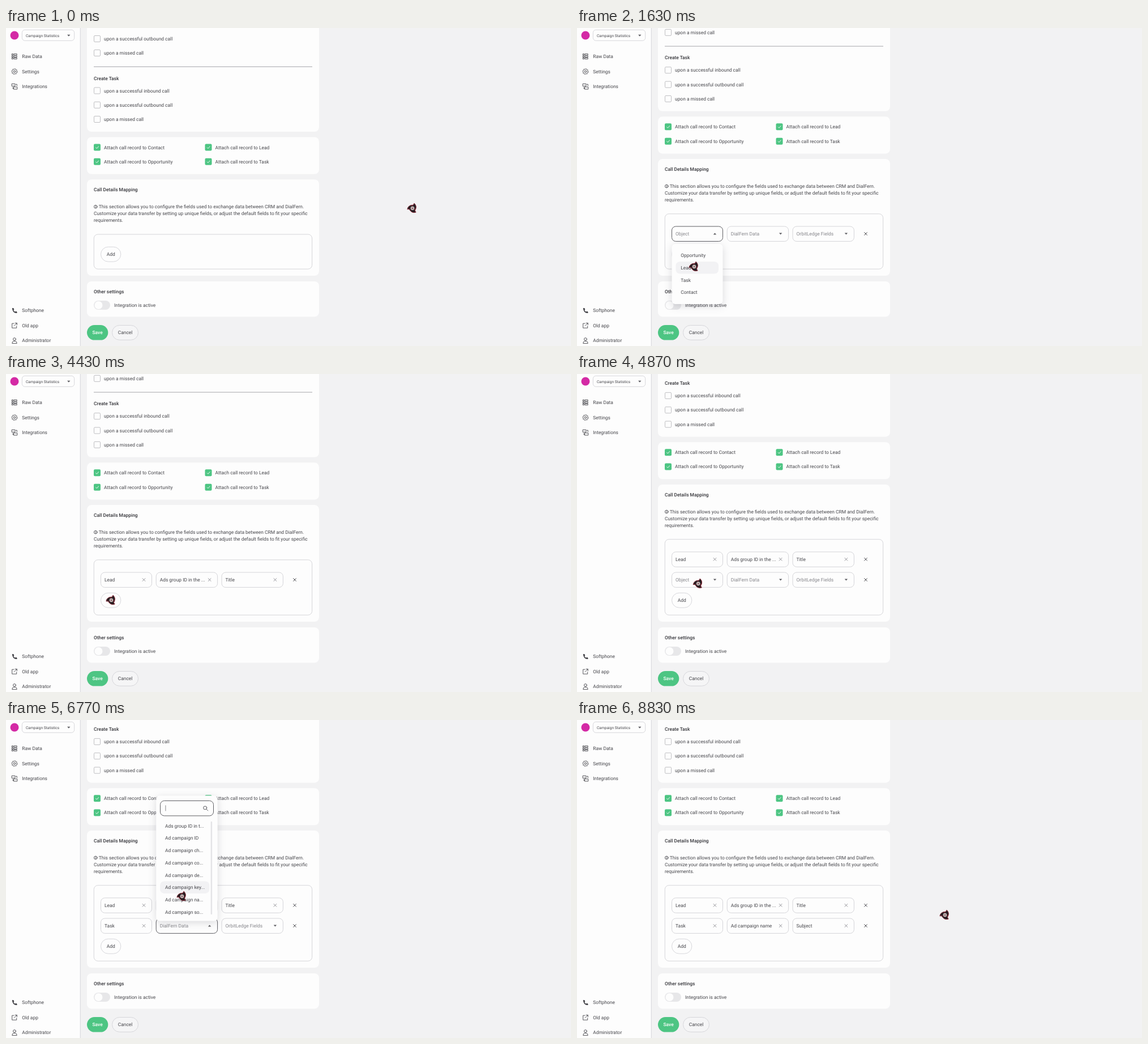
Animation, 998 px wide and 561 px high, one loop 8.86 s. Source, as an HTML page:

```html
<!DOCTYPE html>
<html lang="en">
<head>
<meta charset="utf-8">
<title>Field mapping</title>
<style>
  html, body { margin: 0; height: 100%; overflow: hidden; background: #f2f2f3; }
  svg { display: block; width: 100vw; height: 100vh; }
  text { font: 8.44px Roboto, Arial, sans-serif; fill: #46464b; text-rendering: geometricPrecision; white-space: pre; }
  .head { font-weight: 500; fill: #35353a; }
  .small { font-size: 6.63px; }
  .hint { fill: #85858a; }
  .white { fill: #fff; font-weight: 500; }
  .mid { text-anchor: middle; }
  .icon { fill: none; stroke: #46464b; stroke-width: .9; stroke-linejoin: round; stroke-linecap: round; }
  .pop { filter: drop-shadow(0 3px 7px rgba(40, 40, 60, .17)); }
</style>
</head>
<body>
<svg viewBox="0 0 998 561" preserveAspectRatio="none">
  <g id="page"></g>
  <g id="side"></g>
  <g id="over"></g>
  <g id="cursor"></g>
</svg>
<script>
const LOOP = 8860, ROW = 36.15, ROW_Y = 363;
const $ = id => document.getElementById(id);
const CARD = '#fdfdfd', LINE = '#d3d3d7', DARK = '#55555a', GREEN = '#4dc583';

// Drawing helpers; the y of text is its visual centre
const text = (x, y, s, cls = '') => `<text x="${x}" y="${y + 3}" class="${cls}">${s}</text>`;
const box = (x, y, w, h, r, fill, stroke = 'none', more = '') =>
  `<rect x="${x}" y="${y}" width="${w}" height="${h}" rx="${r}" fill="${fill}" stroke="${stroke}" ${more}/>`;
const path = (d, more = 'class="icon"') => `<path d="${d}" ${more}/>`;
const cross = (x, y, color) =>
  path(`M${x - 2.7} ${y - 2.7}l5.4 5.4m0-5.4l-5.4 5.4`, `stroke="${color}" stroke-width=".9"`);
const caret = (x, y, up) =>
  path(up ? `M${x - 2.7} ${y + 1.5}h5.4l-2.7-3z` : `M${x - 2.7} ${y - 1.5}h5.4l-2.7 3z`, 'fill="#5c5c61"');
const pill = (x, w, y, s) => box(x, y - 13, w, 26, 13, CARD, LINE, 'stroke-width=".9"') + text(x + w / 2, y, s, 'mid');
const group = (dy, s) => `<g transform="translate(0 ${dy})">${s}</g>`;

function check(x, y, label, on) {
  const mark = on
    ? box(x, y - 6, 12, 12, 2, GREEN) + path(`M${x + 3.4} ${y}l2 2 3.4-3.9`, 'fill="none" stroke="#fff" stroke-width=".9"')
    : box(x + .5, y - 5.5, 11, 11, 1.5, CARD, '#b8b8bc', 'stroke-width=".9"');
  return mark + text(x + 18, y, label);
}

const COLS = [
  { x: 167.5, w: 90, hint: 'Object' },
  { x: 265.2, w: 108.4, hint: 'DialFern Data' },
  { x: 381, w: 108.4, hint: 'OrbitLedge Fields' }
];
const OBJECTS = ['Opportunity', 'Lead', 'Task', 'Contact'];
const DATA = ['Ads group ID in t...', ...['ID', 'ch...', 'co...', 'de...', 'key...', 'na...', 'so...'].map(s => 'Ad campaign ' + s)];
const LEAD = ['*Last Name', 'First Name', 'Salutation', 'Title', '*Company', 'Street', 'City', 'State/Province'];
const TASK = ['Subject', 'Due Date', 'Priority', 'Status', 'Comments', 'Type', 'Call Result', 'Related To'];

// Each row: when it is added, when its spinner ends, and per column the open and pick times
const ROWS = [
  { add: 780, ready: 2000, steps: [
    { open: 1180, pick: 1700, list: OBJECTS, value: 'Lead' },
    { open: 2040, pick: 2500, list: DATA, value: 'Ads group ID in the ...' },
    { open: 3000, pick: 3580, list: LEAD, value: 'Title' }] },
  { add: 4560, ready: 5950, steps: [
    { open: 4960, pick: 5470, list: OBJECTS, value: 'Task' },
    { open: 6230, pick: 6950, list: DATA, value: 'Ad campaign name' },
    { open: 7380, pick: 7980, list: TASK, value: 'Subject' }] }
];

// Pointer stops: time, x, y
const PATH = [
  [0, 718, 318], [30, 718, 318], [700, 193, 404], [860, 193, 404], [1100, 215, 369], [1250, 215, 369],
  [1630, 207, 421], [1720, 207, 421], [1950, 320, 370], [2120, 320, 370], [2420, 318, 195], [2560, 318, 195],
  [2900, 424, 369], [3100, 424, 369], [3450, 412, 259], [3680, 412, 259], [4200, 186, 399], [4600, 186, 399],
  [4900, 215, 369], [5050, 215, 369], [5400, 205, 451], [5560, 205, 451], [5730, 239, 438], [6130, 318, 369],
  [6300, 318, 369], [6770, 311, 311], [6880, 313, 323], [7000, 313, 323], [7300, 424, 369], [7480, 424, 369],
  [7850, 412, 194], [8060, 412, 194], [8820, 650, 344], [LOOP, 650, 344]
];

function pointer(t) {
  const i = PATH.findIndex(p => p[0] > t);
  const [t0, x0, y0] = PATH[i - 1], [t1, x1, y1] = PATH[i];
  const k = (t - t0) / (t1 - t0), e = k * k * (3 - 2 * k);
  return [x0 + (x1 - x0) * e, y0 + (y1 - y0) * e];
}

function drawField(col, y, step, t, loading) {
  const { x, w, hint } = COLS[col], end = x + w - 14;
  const open = t >= step.open && t < step.pick, done = t >= step.pick;
  const mark = done ? cross(end, y, '#8b8b90') : caret(end, y, open && t > step.open + 100);
  const body = box(x, y - 13, w, 26.4, 7, CARD, open ? DARK : LINE, 'stroke-width=".95"')
    + text(x + 6.5, y, done ? step.value : hint, done ? '' : 'hint') + mark;
  if (!loading) return body;
  return `<g opacity=".7">${body}</g>`
    + `<circle cx="435" cy="${y}" r="4" fill="none" stroke="#65b9b4" stroke-dasharray="17 8" transform="rotate(${t * .4 % 360 | 0} 435 ${y})"/>`;
}

function drawRow(row, y, t) {
  if (t < row.add) return '';
  const loading = t >= row.steps[0].pick && t < row.ready;
  return row.steps.map((s, i) => drawField(i, y, s, t, loading && i === 2)).join('') + cross(510, y, '#3c3c41');
}

function drawList(col, step, t, hover) {
  const { x, w } = COLS[col], search = col > 0, first = search ? 186.7 : 401.2;
  const top = search ? 133.5 : 381, height = search ? 221 : 106;
  let s = box(x, top, w, height, 6, CARD, 'none', 'class="pop"');
  if (search) {
    const focus = t > step.open + 100;
    s += box(x + 7.3, 142.5, 94, 26.5, 7, CARD, focus ? DARK : LINE, 'stroke-width=".95"')
      + `<circle cx="${x + 86.5}" cy="155" r="3" class="icon"/>` + path(`M${x + 88.8} 157.4l2.6 2.6`)
      + box(x + 96.5, 179, 2.4, 164, 1, '#e3e3e6');
    if (step.list !== DATA) s += box(x + 96.5, 179, 2.4, 30, 1, '#c3c3c8');
    if (focus && (t - step.open) % 1000 < 600) s += path(`M${x + 16.7} 150.5v10`, 'stroke="#55555a" stroke-width=".7"');
  }
  return s + step.list.map((item, i) => {
    const y = first + i * 21.7, lit = Math.abs(hover - y) < 10.85;
    return (lit ? box(x + 7, y - 10.7, search ? 87 : 75.5, 21.4, 7, '#f2f2f4') : '') + text(x + 15.7, y, item);
  }).join('');
}

function drawPage(t) {
  const count = ROWS.filter(r => t >= r.add).length, up = -ROW * count;
  const upper = box(143, -80, 410, 263, 8, CARD)
    + check(155, -7, 'upon a successful inbound call')
    + check(155, 19, 'upon a successful outbound call') + check(155, 44, 'upon a missed call')
    + path('M155 68.3H541', 'stroke="#a5a5aa" stroke-width="1"')
    + text(155, 88.5, 'Create Task', 'head')
    + check(155, 110.5, 'upon a successful inbound call')
    + check(155, 135.8, 'upon a successful outbound call') + check(155, 161, 'upon a missed call')
    + box(143, 192.5, 410, 65.3, 8, CARD)
    + check(155, 210.5, 'Attach call record to Contact', true) + check(351.5, 210.5, 'Attach call record to Lead', true)
    + check(155, 235.8, 'Attach call record to Opportunity', true) + check(351.5, 235.8, 'Attach call record to Task', true);
  const mapping = text(155, 285, 'Call Details Mapping', 'head')
    + '<circle cx="158.3" cy="315.3" r="2.8" class="icon"/>' + path('M158.3 315v1.8m0-3.4v.2')
    + text(163.8, 315.2, 'This section allows you to configure the fields used to exchange data between CRM and DialFern.')
    + text(155, 327.2, 'Customize your data transfer by setting up unique fields, or adjust the default fields to fit your specific')
    + text(155, 339.2, 'requirements.');
  return group(up, upper)
    + box(143, 267.2 + up, 410, 169.8 - up, 8, CARD) + group(up, mapping)
    + box(155.3, 364 + up, 385.3, 61.2 - up, 7, CARD, LINE, 'stroke-width=".95"')
    + ROWS.map((r, i) => drawRow(r, ROW_Y - ROW * (count - 1 - i), t)).join('')
    + pill(167.5, 35.3, 399.2, 'Add')
    + box(143, 447, 410, 62.3, 8, CARD) + text(155, 464.5, 'Other settings', 'head')
    + box(155, 481, 29, 16, 8, '#e7e7e9') + '<circle cx="163.5" cy="489" r="7" fill="#fdfdfd"/>'
    + text(191, 489, 'Integration is active')
    + box(143, 524, 37.3, 26.6, 13.3, GREEN) + text(161.6, 537, 'Save', 'white mid')
    + `<g>${box(187.5, 524.5, 46, 25.8, 12.9, '#f5f5f6', LINE, 'stroke-width=".9"')}${text(210.5, 537, 'Cancel', 'mid')}</g>`;
}

function drawOver(t, hover) {
  return ROWS.map(r => r.steps.map((s, i) =>
    t >= s.open && t < s.pick ? drawList(i, s, t, hover) : '').join('')).join('');
}

function gear(x, y) {
  const points = Array.from({ length: 32 }, (_, i) => {
    const a = (i + .5) * Math.PI / 16, r = i % 4 < 2 ? 5 : 3.9;
    return `${(x + r * Math.cos(a)).toFixed(2)} ${(y + r * Math.sin(a)).toFixed(2)}`;
  });
  return path(`M${points.join('L')}z`) + `<circle cx="${x}" cy="${y}" r="1.7" class="icon"/>`;
}

$('side').innerHTML = box(0, 0, 131, 561, 0, '#fdfdfd') + path('M131.3 0V561', 'stroke="#d5d5da" stroke-width="1"')
  + '<circle cx="15" cy="13" r="7.5" fill="#d42aa5"/>'
  + box(28.4, 3.3, 92.3, 19, 5, CARD, LINE, 'stroke-width=".9"') + text(35, 12.5, 'Campaign Statistics', 'small') + caret(110.8, 13.2)
  + [['Raw Data', 50], ['Settings', 76.5], ['Integrations', 103], ['Softphone', 498.2], ['Old app', 525], ['Administrator', 551.3]]
    .map(([s, y]) => text(28.2, y, s)).join('')
  + [46.8, 50.2, 53.6].map(y => path(`M10.7 ${y - 1.2}h2v2.4h-2zM14.4 ${y - 1.2}h4.8v2.4h-4.8z`)).join('')
  + gear(15, 76.8)
  + path('M10.5 98.5h5.5v4h-5.5zM14 104h5.8v4H14zM17.5 99.3h1.8v2.7M12.2 104.5v2.6h1')
  + path('M10.8 494.3l2.3-.4 1.3 2.7-1.2 1.2q.9 2 2.9 3l1.3-1.2 2.2 1.3-.3 2.2q-7.6.2-8.5-8.8z', 'fill="#3c3c41"')
  + path('M14 521.2h-3.3v8h8v-3.3M14.3 525.5l5-5m-3.2 0h3.2v3.2')
  + '<circle cx="15" cy="549" r="2.4" class="icon"/>' + path('M10.8 556q0-3.3 3-3.6h2.4q3 .3 3 3.6z');

$('cursor').innerHTML = [0, 120, 240].map(a =>
  path('M-9.2 1.8Q-7.5-6 1-5.8L3 0-2 3.6Q-4.8 1-9.2 1.8z',
    `fill="#241c20" stroke="#8d2634" stroke-width=".8" transform="rotate(${a})"`)).join('')
  + '<circle r="3.7" fill="#d0c5c5" stroke="#3a2a2e" stroke-width=".8"/><circle r="1.6" fill="#8a6669"/>';

const shown = {};
function put(id, html) {
  if (shown[id] !== html) $(id).innerHTML = shown[id] = html;
}

const start = performance.now();
function frame() {
  const t = (performance.now() - start) % LOOP, [x, y] = pointer(t);
  put('page', drawPage(t));
  put('over', drawOver(t, y - 7));
  $('cursor').setAttribute('transform', `translate(${x} ${y})`);
  requestAnimationFrame(frame);
}
frame();
</script>
</body>
</html>
```
